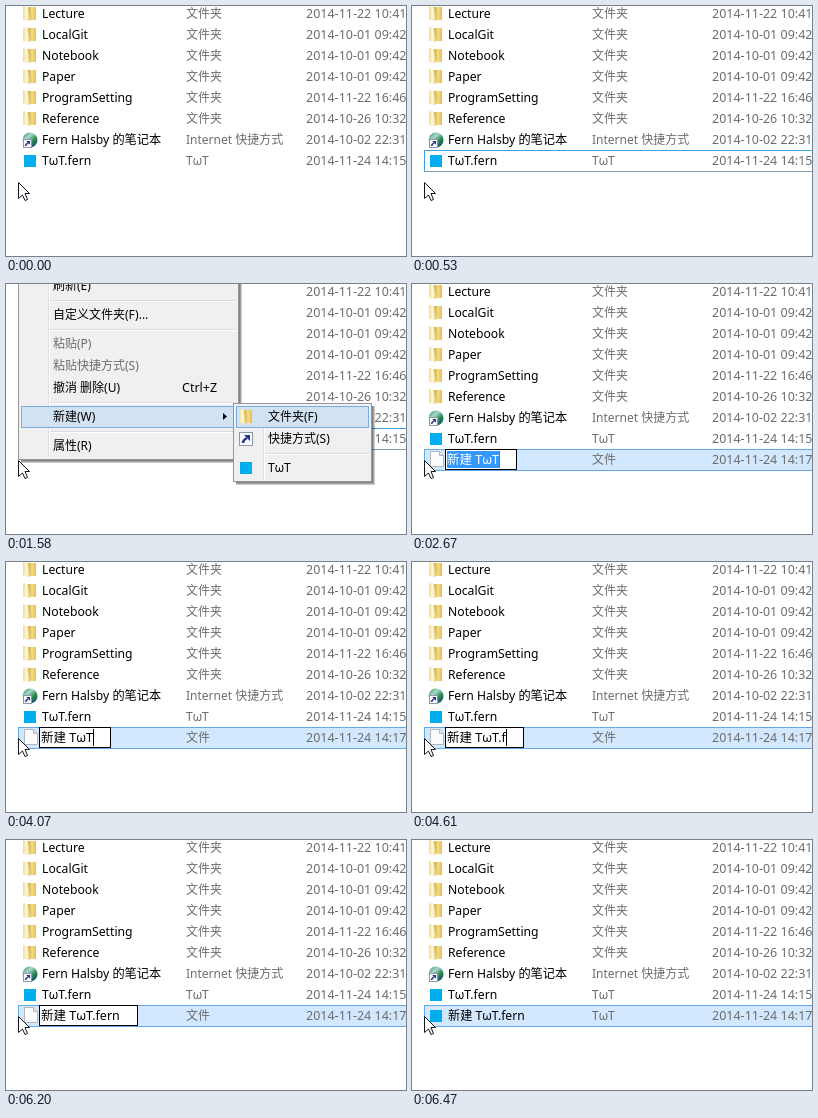
Recreate the animation shown at these times as an HTML page with a canvas. Size 400 by 250 pixels, loop 8000 ms.

```html
<!DOCTYPE html>
<html lang="zh-CN">
<head>
<meta charset="utf-8">
<title>新建文件</title>
<style>
html, body { margin: 0; width: 100%; height: 100%; overflow: hidden; background: #fff; }
canvas { display: block; width: 400px; height: 250px; }
</style>
</head>
<body>
<canvas id="stage" width="400" height="250"></canvas>
<script>
const ctx = document.getElementById('stage').getContext('2d');
const time = {
  focus: 530, menu: 800, subMenu: 1580, create: 2670, caretOff: 3230, deselect: 3510,
  caretOn: 4070, keys: [4340, 4610, 4860, 5390, 5670], idle: 6200, rename: 6470, loop: 8000
};
const BLACK = '#000', GRAY = '#6d6d6d', BLUE = '#3c9fe0';
const ROW = 21;
const EXT = '.fern';
const NEW_NAME = '新建 TωT';
const SMALL = 12, NORMAL = 12.2, WIDE = 12.5;

const folder = (name, date) => ['folder', name, '文件夹', date];
const files = [
  folder('Lecture', '2014-11-22 10:41'),
  folder('LocalGit', '2014-10-01 09:42'),
  folder('Notebook', '2014-10-01 09:42'),
  folder('Paper', '2014-10-01 09:42'),
  folder('ProgramSetting', '2014-11-22 16:46'),
  folder('Reference', '2014-10-26 10:32'),
  ['globe', 'Fern Halsby 的笔记本', 'Internet 快捷方式', '2014-10-02 22:31'],
  ['tile', 'TωT' + EXT, 'TωT', '2014-11-24 14:15']
];

// A null entry is a separator.
const menuItems = [
  '刷新(E)', null, '自定义文件夹(F)...', null,
  '粘贴(P)', '粘贴快捷方式(S)', '撤消 删除(U)', null, '新建(W)', null, '属性(R)'
];
const subItems = ['文件夹(F)', '快捷方式(S)', null, 'TωT'];
const subIcons = { '文件夹(F)': 'folder', '快捷方式(S)': 'shortcut', 'TωT': 'tile' };

function rect(x, y, w, h, fill) {
  ctx.fillStyle = fill;
  ctx.fillRect(x, y, w, h);
}

function frame(x, y, w, h, fill, line) {
  rect(x, y, w, h, line);
  rect(x + 1, y + 1, w - 2, h - 2, fill);
}

function setFont(size) {
  ctx.font = `${size}px "Noto Sans", "Noto Sans CJK SC", "Noto Sans CJK", sans-serif`;
}

function text(str, x, baseline, color = BLACK, size = SMALL) {
  setFont(size);
  ctx.fillStyle = color;
  ctx.fillText(str, x, baseline);
}

function shape(path, fill, line) {
  const p = new Path2D(path);
  ctx.fillStyle = fill;
  ctx.fill(p);
  ctx.strokeStyle = line || 'transparent';
  ctx.stroke(p);
}

function gradient(x0, y0, x1, y1, ...colors) {
  const g = ctx.createLinearGradient(x0, y0, x1, y1);
  colors.forEach((c, i) => g.addColorStop(i / (colors.length - 1), c));
  return g;
}

function badge(x, y, size) {
  frame(x, y, size, size, '#f8faff', '#8d99a5');
  ctx.save();
  ctx.translate(x, y);
  ctx.scale(size / 14, size / 14);
  ctx.lineWidth = 2.5;
  shape('M4 11Q4 8 8 6', 'transparent', '#25338d');
  shape('M5 3H11V9Z', '#25338d');
  ctx.restore();
}

// Icons fill a 16 by 16 cell.
const icons = {
  folder() {
    rect(6, 1, 8, 13, gradient(6, 0, 14, 0, '#c9a544', '#f5dc86', '#e2bd58'));
    shape('M1 0L6 1L8 15L1 14Z', gradient(1, 0, 8, 0, '#f2dc8c', '#fff8d2', '#ecd07a'));
  },
  globe() {
    ctx.beginPath();
    ctx.arc(8, 8, 7.5, 0, Math.PI * 2);
    ctx.fillStyle = gradient(2, 1, 14, 14, '#3f9747', '#a8d8d8', '#2f8a4a', '#16477c');
    ctx.fill();
    badge(1, 7, 9);
  },
  tile() {
    rect(2, 2, 12, 12, '#00adef');
  },
  page() {
    shape('M2.5 -.5H11.5L15.5 3.5V14.5H2.5Z', '#fcfcfc', '#b4b8bc');
    shape('M11.5 -.5V3.5H15.5', '#e5e7e9', '#b4b8bc');
  },
  shortcut() {
    badge(1, 1, 14);
  }
};

function icon(kind, x, y) {
  ctx.save();
  ctx.translate(x, y);
  icons[kind]();
  ctx.restore();
}

function fileRow(index, [kind, name, type, date]) {
  const top = index * ROW, base = top + 12;
  icon(kind, 16, top);
  text(name, 36, base, BLACK, NORMAL);
  text(type, 180, base, GRAY);
  text(date, 300, base, GRAY, WIDE);
}

function panel(x, y, w, h, gutter) {
  for (let i = 1; i <= 3; i++) rect(x + 3, y + 3, w - 3 + i, h - 3 + i, 'rgba(0,0,0,.2)');
  frame(x, y, w, h, '#f0f0f0', '#979797');
  rect(gutter, y + 3, 1, h - 6, '#e0e0e0');
  rect(gutter + 1, y + 3, 1, h - 6, '#fff');
}

function itemList(items, x, base, right) {
  for (const item of items) {
    if (item) {
      text(item, x, base, item.startsWith('粘贴') ? GRAY : BLACK);
      if (subIcons[item]) icon(subIcons[item], 232, base - 12);
      base += 22;
    } else {
      rect(x - 3, base - 12, right - x + 3, 1, '#dcdcdc');
      rect(x - 3, base - 11, right - x + 3, 1, '#fff');
      base += 7;
    }
  }
}

function highlight(x, w) {
  frame(x, 122, w, 22, '#d1e2f2', '#78aee5');
}

function contextMenu(open) {
  panel(12, -20, 221, 196, 42);
  if (open) highlight(15, 216);
  itemList(menuItems, 47, 6, 230);
  text('Ctrl+Z', 176, 108, BLACK, WIDE);
  shape('M217 129l4 3.5l-4 3.5Z', BLACK);
}

function subMenu() {
  panel(227, 119, 139, 79, 257);
  highlight(230, 133);
  itemList(subItems, 262, 137, 363);
}

function nameEditor(t) {
  const typed = time.keys.filter(at => t >= at).length;
  const value = NEW_NAME + EXT.slice(0, typed);
  const selected = t < time.deselect;
  const caretShown = t < time.caretOff || (t >= time.caretOn && t < time.idle);
  setFont(WIDE);
  const caret = Math.round(35.5 + ctx.measureText(value).width);
  frame(33, 165, caret - 15, 21, '#fff', BLACK);
  if (selected) rect(35, 167, caret - 34, 17, '#3399ff');
  text(value, 35, 180, selected ? '#fff' : BLACK, WIDE);
  if (caretShown) rect(caret, 167, 1, 17, selected ? '#cc6600' : BLACK);
}

function newFile(t) {
  const done = t >= time.rename;
  const [kind, name, type] = done ? ['tile', NEW_NAME + EXT, 'TωT'] : ['page', '', '文件'];
  frame(12, 165, 400, 22, '#d1e8ff', '#66a7e8');
  fileRow(files.length, [kind, name, type, '2014-11-24 14:17']);
  if (!done) nameEditor(t);
}

function focusRow() {
  frame(12, 144, 400, 22, '#fff', BLUE);
  rect(12, 165, 388, 1, '#7f9db5');
}

function draw(t) {
  rect(0, 0, 400, 250, '#fff');
  const created = t >= time.create;
  if (t >= time.focus && !created) focusRow();
  files.forEach((file, i) => fileRow(i, file));
  if (t >= time.menu && !created) contextMenu(t >= time.subMenu);
  if (t >= time.subMenu && !created) subMenu();
  if (created) newFile(t);
  shape('M12.5 176.5v16l4 -3.5l2.5 5.5l2.5 -1l-2.5 -6h4.5Z', '#fff', '#15151f');
}

const start = performance.now();
function tick() {
  draw((performance.now() - start) % time.loop);
  requestAnimationFrame(tick);
}
tick();
</script>
</body>
</html>
```
